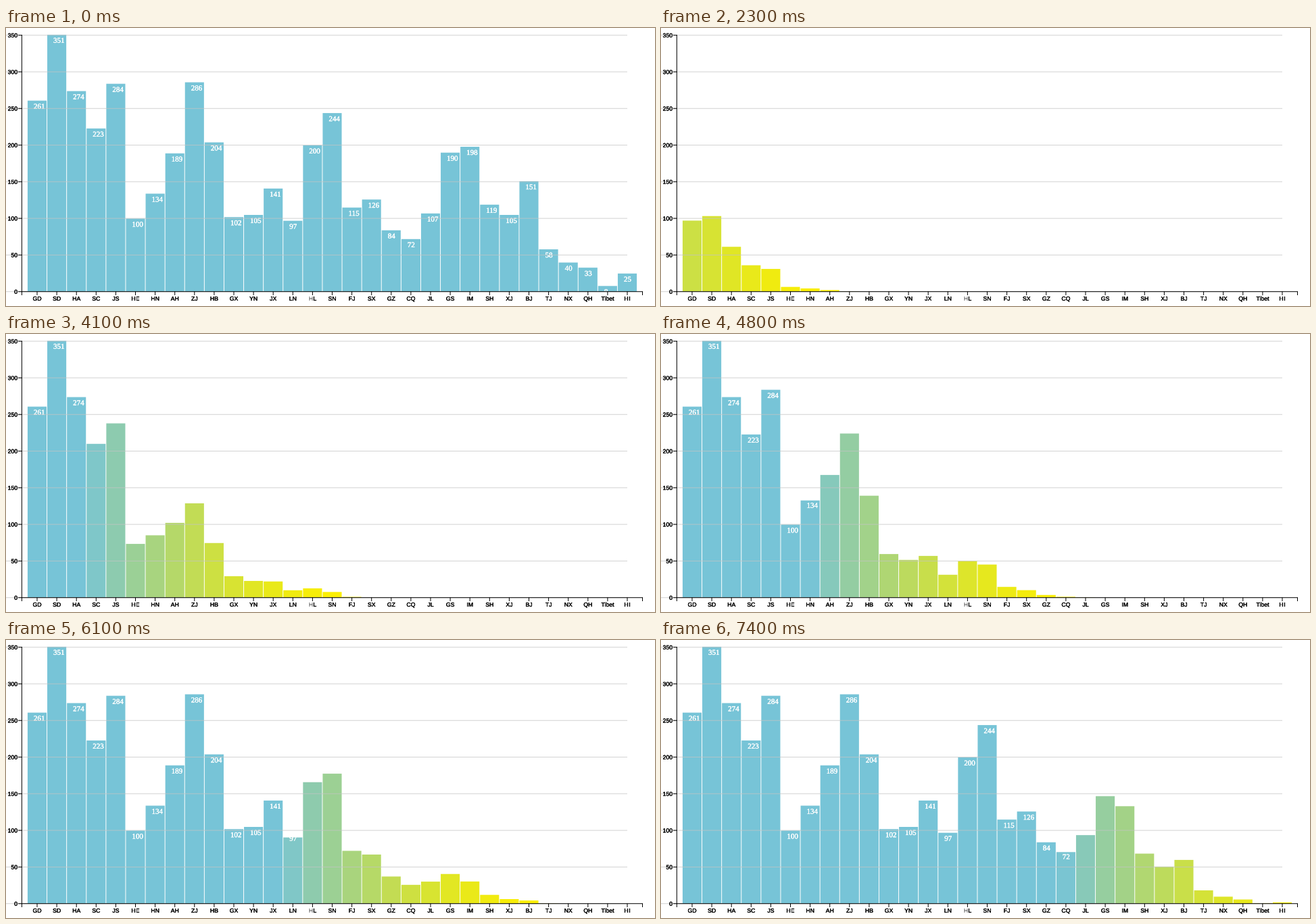
A matplotlib script for the animation above (7.5 s loop, 960x412 px).

```python
import numpy as np
import matplotlib
import matplotlib.pyplot as plt
from matplotlib import patheffects
from matplotlib.animation import FuncAnimation
from matplotlib.patches import Rectangle

matplotlib.rcParams["text.hinting"] = "none"

W, H, DPI = 960, 412, 100
PX = 72 / DPI                      # one pixel in points
FRAMES, INTERVAL = 75, 100

LABELS = ("GD SD HA SC JS HE HN AH ZJ HB GX YN JX LN HL SN FJ SX GZ CQ JL "
          "GS IM SH XJ BJ TJ NX QH Tibet HI").split()
VALUES = np.array([261, 351, 274, 223, 284, 100, 134, 189, 286, 204, 102,
                   105, 141, 97, 200, 244, 115, 126, 84, 72, 107, 190, 198,
                   119, 105, 151, 58, 40, 33, 8, 25])

LEFT, RIGHT, AXIS_Y = 23.4, 941.5, 390.7
UNIT = 380 / 350                   # pixels per value
BASE = 391
FIRST, STEP, BAR_W = 46.0, 29.1, 28.1
CENTERS = FIRST + STEP * np.arange(len(VALUES))

YELLOW = np.array([255, 240, 0]) / 255
BLUE = np.array([119, 196, 215]) / 255
BEND = np.array([1, 1, 1.17])      # the blue channel rises a little late

DELAY, DURATION = 200, 3000
RESET = 6                          # the full chart is cleared here
CLOCK, OFFSET = 99.2, 577          # ms per frame, ms before the growth

fig = plt.figure(figsize=(W / DPI, H / DPI), dpi=DPI, facecolor="white")
ax = fig.add_axes([0, 0, 1, 1])
ax.set_xlim(0, W)
ax.set_ylim(H, 0)
ax.axis("off")


def line(x, y, color="black", z=5, **kw):
    ax.plot(x, y, color=color, lw=PX, zorder=z, snap=False,
            solid_capstyle="butt", **kw)


def label(x, y, s, size, font, color="black", ha="center", z=5):
    # A hairline stroke gives the small type its weight.
    bold = [patheffects.Stroke(linewidth=0.2, foreground=color),
            patheffects.Normal()]
    ax.text(x, y, s, fontsize=size * PX, family=font, color=color,
            ha=ha, va="baseline", zorder=z, path_effects=bold)


bars = []
for i, (cx, v) in enumerate(zip(CENTERS, VALUES)):
    x = cx - BAR_W / 2
    bar = Rectangle((x, BASE), BAR_W, 0, lw=0, zorder=1, snap=False)
    bars.append(ax.add_patch(bar))
    # White numbers only show once a bar has grown behind them.
    label(x + 9, BASE - v * UNIT + 12, str(v), 11, "Liberation Serif",
          "white", "left", 2)
    line([cx, cx], [AXIS_Y, 396])
    label(cx, 404, LABELS[i], 8.7, "Liberation Sans")

for v in range(0, 351, 50):
    y = AXIS_Y - v * UNIT
    line([0, 919], [y, y], "#c4c4c4", 3, alpha=0.75)
    line([18, LEFT], [y, y])
    label(17, y + 3.2, str(v), 8.7, "Liberation Sans", ha="right")

line([LEFT, LEFT], [10, 396])
line([LEFT - 0.5, RIGHT + 0.5], [AXIS_Y, AXIS_Y])
line([RIGHT, RIGHT], [AXIS_Y, 396])


def grown(n):
    """Eased share of the final height for every bar."""
    if n < RESET:
        return np.ones(len(VALUES))
    elapsed = n * CLOCK - OFFSET - DELAY * np.arange(len(VALUES))
    return 1 - np.cos(np.clip(elapsed / DURATION, 0, 1) * np.pi / 2)


def update(n):
    for bar, v, k in zip(bars, VALUES, grown(n)):
        h = v * k * UNIT
        bar.set_y(BASE - h)
        bar.set_height(h)
        bar.set_facecolor(YELLOW + (BLUE - YELLOW) * k ** BEND)
        bar.set_visible(h > 0)
    return bars


anim = FuncAnimation(fig, update, frames=FRAMES, interval=INTERVAL,
                     repeat=True, repeat_delay=0, blit=False)
plt.show()
```
